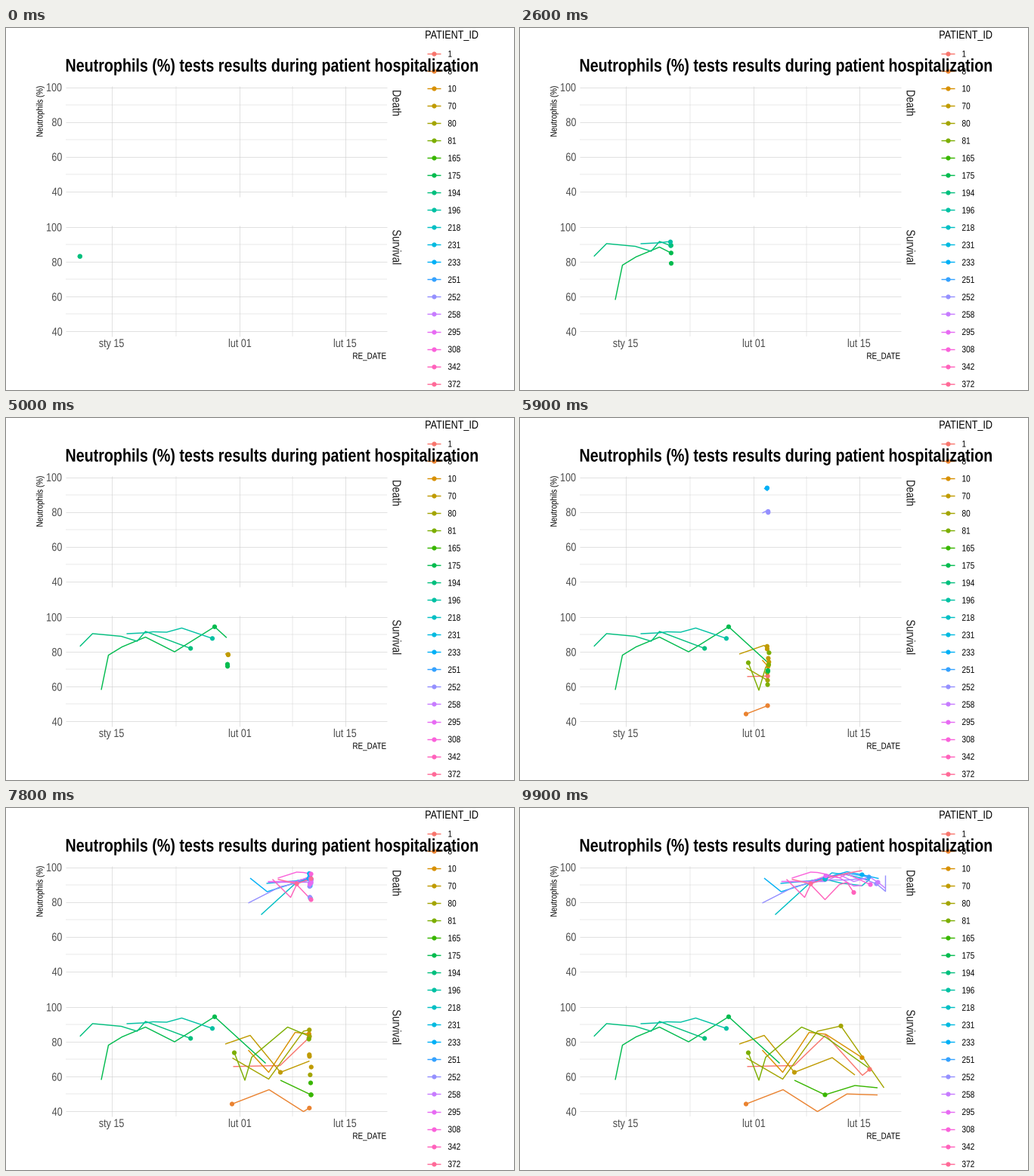
A matplotlib script for the animation above (10000 ms loop, 672 by 480 pixels).

```python
import matplotlib.pyplot as plt
import numpy as np
from matplotlib.animation import FuncAnimation
from matplotlib.patches import PathPatch
from matplotlib.textpath import TextPath
from matplotlib.transforms import Affine2D

W, H, DPI = 672, 480, 100
FRAMES, INTERVAL = 100, 100
PX = 72 / DPI                     # points per pixel
X_START, X_STEP = 97.3, 3.903     # reveal front in pixels
CONDENSED = 0.82                  # one factor for the whole narrow face
LINE_W, DOT = 1.42, 6.2
LEFT, RIGHT = 78, 503

# Test results in stage pixels, in record order; the last record stays visible.
survival = {
    1: [(300, 342.3), (362, 341), (404, 300.5), (452.5, 354), (462, 346)],
    8: [(472.5, 380), (432, 378.7), (393, 402), (347.5, 373), (298.5, 392)],
    10: [(320, 320.5), (347, 350), (382, 297), (404, 299.5), (452, 330.5)],
    70: [(442.5, 353.5), (289.5, 312.5), (412.5, 330.5), (322.5, 301),
         (362.5, 350)],
    80: [(347, 359), (299, 331), (481, 370.5), (393, 295.5), (424, 288.5)],
    81: [(462, 345), (404, 303.5), (315.5, 360.5), (324.5, 330), (372, 290),
         (301.5, 324)],
    165: [(362.5, 360.5), (442.5, 367.5), (472.5, 370.5), (403, 379.8)],
    175: [(125.5, 360), (135, 314), (153, 303), (343, 338), (222.5, 309.5),
          (184, 290), (275.5, 276.3)],
    194: [(114, 285.4), (152, 289), (97.3, 302.3), (173, 295.5),
          (184, 282.5), (243.7, 305)],
    196: [(159, 285.5), (184, 284.3), (194, 283), (212, 283.5), (232, 278),
          (272.5, 291.8)],
}
death = {
    218: [(462, 94), (452, 102.5), (337, 141), (384, 98), (424, 99),
          (403, 94)],
    231: [(344, 99.5), (384, 96), (412, 85.5), (432, 88), (462, 95),
          (404, 92)],
    233: [(403, 92), (384, 98), (345, 110.5), (474, 93), (322.5, 92.5),
          (432, 84), (452, 88)],
    251: [(384, 96), (412, 90), (432, 86), (461, 91)],
    252: [(432, 95), (320, 125.5), (483, 110), (483, 89), (452, 93),
          (403, 95), (362, 104), (384, 99), (471, 100)],
    258: [(345, 97), (403, 97), (422, 88), (441, 97), (462, 91), (483, 106),
          (473, 98)],
    295: [(346, 97), (441, 103), (452, 102), (384, 97), (422, 92),
          (404, 89.5)],
    308: [(359, 92.5), (384, 84.5), (393, 85), (403, 87), (422, 92),
          (432, 87), (463, 101)],
    342: [(352, 94), (376, 118), (384, 101), (403, 121), (422, 101),
          (432, 98), (441, 111.5)],
    372: [(452, 82.5), (432, 86), (403, 93), (359, 94), (384, 100)],
}
patients = {**survival, **death}


def hue(i, n=20, lum=65, chroma=100):
    """Evenly spaced hue on the polar LUV wheel as sRGB."""
    h = np.radians(15 + 360 * i / n)
    y = ((lum + 16) / 116) ** 3
    u = chroma * np.cos(h) / (13 * lum) + 0.1978398
    v = chroma * np.sin(h) / (13 * lum) + 0.4683363
    x = 9 * y * u / (4 * v)
    z = -x / 3 - 5 * y + 3 * y / v
    rgb = np.array([3.240479 * x - 1.537150 * y - 0.498535 * z,
                    -0.969256 * x + 1.875992 * y + 0.041556 * z,
                    0.055648 * x - 0.204043 * y + 1.057311 * z])
    rgb = np.clip(rgb, 0, 1)
    return np.where(rgb > 0.00304, 1.055 * rgb ** (1 / 2.4) - 0.055,
                    12.92 * rgb)


fig = plt.figure(figsize=(W / DPI, H / DPI), dpi=DPI, facecolor="white")
ax = fig.add_axes([0, 0, 1, 1])
ax.set_xlim(-0.5, W - 0.5)
ax.set_ylim(H - 0.5, -0.5)
ax.axis("off")


def label(x, y, s, size, color="black", weight="normal", align=0.0, angle=0):
    """Narrow text on a baseline; align 0 is left, 1 is right."""
    path = TextPath((0, 0), s, size=size,
                    prop={"family": "Liberation Sans", "weight": weight})
    box = path.get_extents()
    shift = -align * (box.x0 + box.x1)
    move = (Affine2D().translate(shift, 0).scale(CONDENSED, 1)
            .rotate_deg(angle).scale(1, -1).translate(x, y))
    ax.add_patch(PathPatch(path, fc=color, lw=0, zorder=10,
                           transform=move + ax.transData))


def panel(top, first, name):
    """Grid, y labels and strip text; first is the pixel row of 100 %."""
    bottom = top + 147
    step = 46.13
    for i in range(7):
        ax.hlines(first + i * step / 2, LEFT, RIGHT, color="#cccccc",
                  lw=(0.43 if i % 2 else 0.57) * PX, zorder=1)
    for x, lw in ((139, .57), (224, .43), (308.5, .57), (378.5, .43),
                  (448.5, .57)):
        ax.vlines(x, top, bottom, color="#cccccc", lw=lw * PX, zorder=1)
    for i, value in enumerate((100, 80, 60, 40)):
        label(74, first + i * step + 5.4, str(value), 15.33, "#4d4d4d",
              align=1)
    label(511, top + 5.5, name, 16, "#1a1a1a", angle=-90)


panel(76, 78, "Death")
panel(261.4, 263.6, "Survival")
for x, s in ((139, "sty 15"), (309, "lut 01"), (448, "lut 15")):
    label(x, 422.5, s, 15.33, "#4d4d4d", align=0.5)
label(RIGHT, 438.3, "RE_DATE", 12, align=1)
label(48, 76, "Neutrophils (%)", 12, align=1, angle=90)
label(78, 57.2, "Neutrophils (%) tests results during patient hospitalization",
      24, weight="bold")
label(553.7, 13.5, "PATIENT_ID", 15.33)

dot_area = (DOT * PX) ** 2
tracks = []
for i, (pid, rows) in enumerate(patients.items()):
    color = hue(i)
    y = 33.4 + 23.04 * i
    ax.plot([556.3, 574.7], [y, y], color=color, lw=LINE_W * PX,
            solid_capstyle="butt", zorder=2)
    ax.scatter([565.2], [y], s=dot_area, color=[color], lw=0, zorder=3)
    label(584, y + 4.5, str(pid), 12.27)

    rows = np.array(rows, float)
    keys = np.rint((rows[:, 0] - X_START) / X_STEP).astype(int)
    order = np.argsort(rows[:, 0], kind="stable")
    line, = ax.plot([], [], color=color, lw=LINE_W * PX, zorder=4,
                    solid_capstyle="butt", solid_joinstyle="round")
    tracks.append((rows, keys, order, line, color))
dots = ax.scatter([], [], s=dot_area, lw=0, zorder=5)


def between(p, q, a, b, f):
    return p + (q - p) * (f - a) / (b - a)


def path_until(pts, keys, f):
    n = np.count_nonzero(keys <= f)
    shown = list(pts[:n])
    if 0 < n < len(pts):
        shown.append(between(pts[n - 1], pts[n], keys[n - 1], keys[n], f))
    return np.array(shown).reshape(-1, 2)


def moving_dots(rows, keys, f):
    """One dot on every step between consecutive records that spans f."""
    out = []
    for p, q, a, b in zip(rows, rows[1:], keys, keys[1:]):
        if min(a, b) <= f < max(a, b):
            out.append(between(p, q, a, b, f))
    if f >= keys[-1]:
        out.append(rows[-1])
    return out


def draw(f):
    spots, colors = [], []
    for rows, keys, order, line, color in tracks:
        line.set_data(*path_until(rows[order], keys[order], f).T)
        new = moving_dots(rows, keys, f)
        spots += new
        colors += [color] * len(new)
    dots.set_offsets(np.array(spots).reshape(-1, 2))
    dots.set_facecolor(colors)
    return [dots]


anim = FuncAnimation(fig, draw, frames=FRAMES, interval=INTERVAL,
                     repeat=True, repeat_delay=0, blit=False)
plt.show()
```
